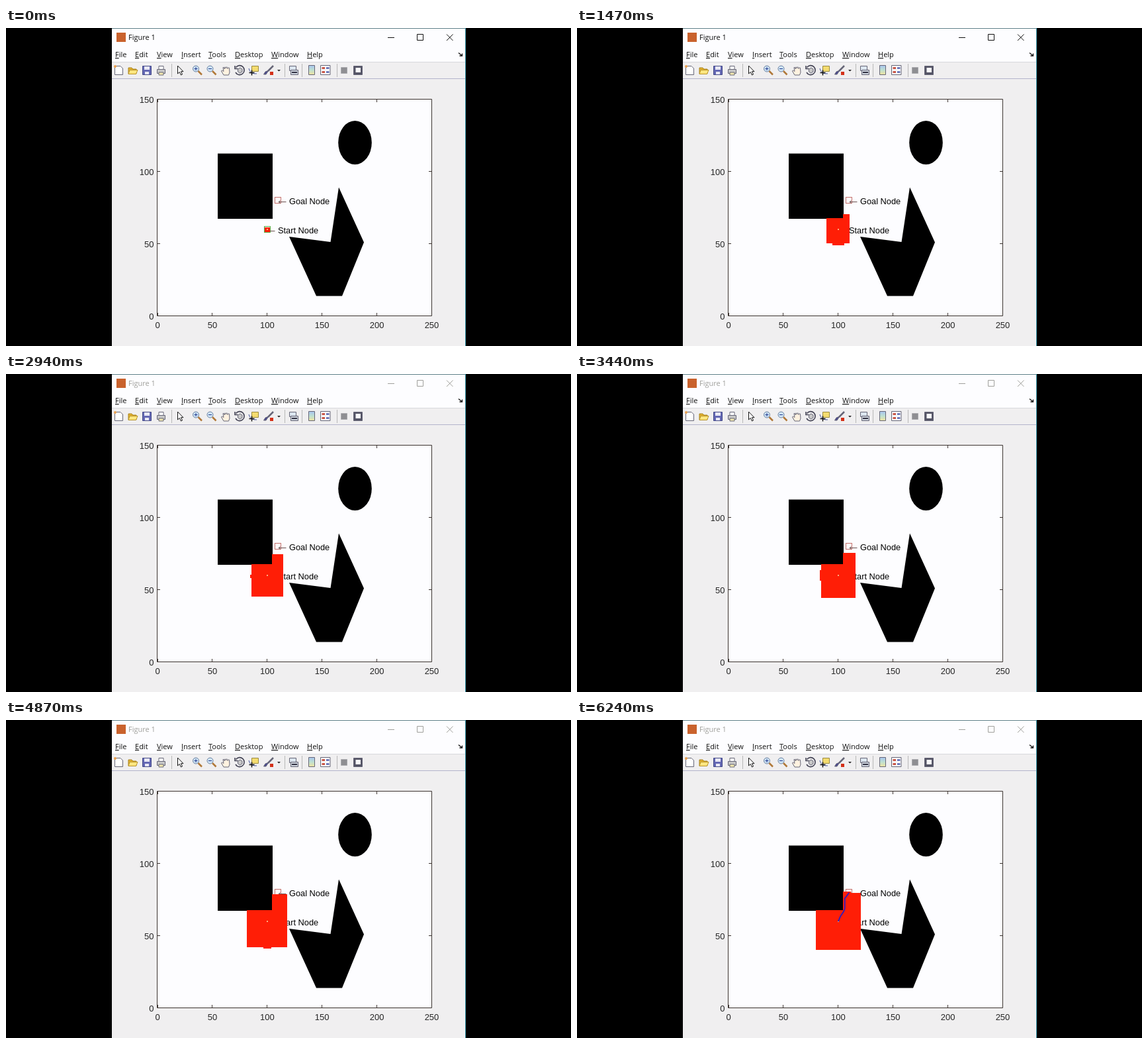
An HTML page with a canvas that plays this animation: 854 by 480 pixels, repeating every 6.27 s.

```html
<!DOCTYPE html>
<html lang="en">
<head>
<meta charset="utf-8">
<title>Grid search</title>
<style>
html, body { margin: 0; width: 100%; height: 100%; overflow: hidden; background: #000; }
svg, canvas { position: absolute; left: 0; top: 0; }
.ui { font: 11px "Open Sans", "Noto Sans", sans-serif; fill: #111; }
.plot { font: 13px "Liberation Sans", Arial, sans-serif; fill: #262626; }
.note { font: 12.8px "Liberation Sans", Arial, sans-serif; fill: #000; }
#caption { --ink: #111; }
#caption.idle { --ink: #a0a09c; }
#caption text { fill: var(--ink); }
#caption path { stroke: var(--ink); fill: none; }
</style>
</head>
<body>
<svg width="854" height="480" viewBox="0 0 854 480">
  <rect x="160" width="534" height="480" fill="#f0eff0"/>
  <rect x="160" y="1" width="534" height="50" fill="#fdfdff"/>
  <path d="M694.5 0V480" stroke="#3f9fb4"/>
  <path d="M160 .5H694" stroke="#5f8088"/>
  <path d="M160 51.5H694" stroke="#d8d8dc"/>
  <path d="M160 76.5H694" stroke="#b4b4cc"/>

  <g id="caption">
    <rect x="167" y="7" width="14" height="14" fill="#c9622d"/>
    <text class="ui" x="185" y="18">Figure 1</text>
    <path d="M577 14.5H587M621.5 9.5H630.5V18.5H621.5ZM666 9.5L675.5 19M675.5 9.5L666 19"/>
  </g>
  <g class="ui" id="menu"></g>
  <path d="M684 37.5L689 41.5M689.5 38.5V42H685.5" stroke="#111" fill="none" stroke-width="1.3"/>

  <g id="tools" stroke="#667" fill="none">
    <path d="M250.5 54V74M421.5 54V74M447.5 54V74M500.5 54V74" stroke="#b8b8b8"/>
    <path d="M164.5 57.5H173L176.5 61V70.5H164.5Z" fill="#fff"/>
    <circle cx="165" cy="58" r="2" fill="#e8a050" stroke="none"/>
    <path d="M185 60H190L192 62H197V69H185Z" fill="#e0b030" stroke="#a88420"/>
    <path d="M187 63.5H199L196.5 69.5H185Z" fill="#ffe680" stroke="#b8942a"/>
    <path d="M206.5 57.5H219.5V70.5H206.5Z" fill="#6468b4" stroke="#444a88"/>
    <path d="M209 58H217V63H209ZM210 66H216V70H210Z" fill="#e8e8f4" stroke="none"/>
    <path d="M231 62V57.5H238V62" fill="#fff"/>
    <path d="M228.5 62.5H240.5V68.5H228.5Z" fill="#c8c8c8"/>
    <path d="M231 67H238V71H231Z" fill="#f4eab0"/>
    <path d="M259.5 57V69L262.3 66.4L264.5 71L266.500 70L264.4 65.7H268Z" fill="#fff" stroke="#111"/>
    <g id="lens">
      <circle cx="287" cy="61.5" r="4.5" fill="#cfe4f4" stroke="#6a80a0"/>
      <path d="M290.5 65L296 70.5" stroke="#b07838" stroke-width="2.5"/>
      <path d="M284.5 61.5H289.5" stroke="#223a90"/>
    </g>
    <use href="#lens" x="21.5"/>
    <path d="M287 59V64" stroke="#223a90"/>
    <path d="M329 71L325.5 65Q326 63 329 65.5L328 59.5Q329 58 330.5 62Q330.5 56 332.5 61Q334 56 335 61.5Q337 58 337.5 61L338 67L336.5 71Z" fill="#fff2e0"/>
    <path d="M347.5 59.5A7 7 0 1 1 347 67M346 57V61.5H350.5" stroke="#445" stroke-width="1.6"/>
    <path d="M350.5 62L354 60L357 62V66L353.5 68L350.5 66Z" fill="#c8c8c8"/>
    <path d="M371.5 57.5H381.5V65.5H371.5Z" fill="#f4dc70" stroke="#9a8a40"/>
    <path d="M367 61Q369 70 379 69" stroke="#4455a0"/>
    <path d="M371.5 63.5V71.5M367.5 67.5H375.5" stroke="#111" stroke-width="1.5"/>
    <path d="M404 57L396 65" stroke="#667" stroke-width="2.5"/>
    <path d="M397 64L393 70H389.5L392 66Z" fill="#4a4a90"/>
    <rect x="399" y="66" width="5" height="5" fill="#d33018" stroke="none"/>
    <path d="M410 63H415L412.5 65.5Z" fill="#222" stroke="none"/>
    <path d="M428.5 57.5H438.5V64.5H428.5Z" fill="#dce6f0"/>
    <path d="M430.5 63.5H441.5V70.5H430.5Z" fill="#ccd2dc"/>
    <path d="M432 67H440" stroke="#334" stroke-width="2"/>
    <path d="M457.5 56.5H466.5V70.5H457.5Z" fill="url(#bar)"/>
    <path d="M475.5 56.5H490V70.5H475.5Z" fill="#f8f8fa"/>
    <path d="M477.5 59H482V62H477.5ZM477.5 65H482V68H477.5Z" fill="#c85848" stroke="none"/>
    <path d="M484 60.5H488.5M484 66.5H488.5" stroke="#3848a0" stroke-width="2"/>
    <path d="M506.5 59.5H515.5V68.5H506.5Z" fill="#8e8e92" stroke="#aaaaae"/>
    <path d="M525.5 57.5H538.5V70.5H525.5Z" fill="#556"/>
    <path d="M528.5 60H536V67H528.5Z" fill="#f8f8fa" stroke="none"/>
  </g>
  <linearGradient id="bar" x2="0" y2="1">
    <stop stop-color="#a8c4f0"/><stop offset=".5" stop-color="#bfe0d0"/><stop offset="1" stop-color="#f0e4a0"/>
  </linearGradient>

  <rect x="229" y="108" width="414" height="327" fill="#fdfdff"/>
  <rect x="320" y="189.5" width="83" height="98.500"/>
  <ellipse cx="527.5" cy="173" rx="25.3" ry="33"/>
  <path d="M428 315L490.5 323L503 240.5L541 323.500L508 404.5H469Z"/>
  <g class="plot" id="axes">
    <path id="frame" fill="none" stroke="#3c3430"/>
  </g>
  <rect x="406.5" y="255.5" width="9" height="9" fill="none" stroke="#c4706c"/>
  <rect x="390.5" y="299.5" width="9" height="9" fill="none" stroke="#58b048"/>
  <path d="M412 262.5H423.5M414.5 260.5L412 262.5L414.5 264.5M395.5 306.5H406.5" fill="none" stroke="#6a5050"/>
  <g class="note">
    <text x="428" y="266">Goal Node</text>
    <text x="411" y="309.5">Start Node</text>
  </g>
</svg>
<canvas id="search" width="854" height="480"></canvas>

<script>
const LOOP = 6270, PATH_AT = 6200, IDLE_AT = 1950;
const START = { u: 100, v: 60 };
const px = u => 229 + u * 1.658;
const py = v => 435 - v * 2.18;
const crisp = n => Math.floor(n) + 0.5;

function addText(parent, x, y, text, anchor = "start") {
  const el = document.createElementNS("http://www.w3.org/2000/svg", "text");
  el.setAttribute("x", x);
  el.setAttribute("y", y);
  el.setAttribute("text-anchor", anchor);
  el.textContent = text;
  parent.append(el);
  return el;
}

const menu = document.getElementById("menu");
const items = { File: 165, Edit: 195, View: 228, Insert: 265, Tools: 306, Desktop: 346, Window: 401, Help: 455 };
for (const [name, x] of Object.entries(items)) {
  const el = addText(menu, x, 44, "");
  el.innerHTML = `<tspan text-decoration="underline">${name[0]}</tspan>${name.slice(1)}`;
}

const axes = document.getElementById("axes");
let frame = "M228.5 107.5H643.5V434.5H228.5Z";
for (let u = 0; u <= 250; u += 50) {
  const x = crisp(px(u));
  addText(axes, px(u), 453, u, "middle");
  frame += `M${x} 434v-4M${x} 108v4`;
}
for (let v = 0; v <= 150; v += 50) {
  const y = crisp(py(v) - 0.5);
  addText(axes, 223.5, py(v) + 5, v, "end");
  frame += `M229 ${y}h4M643 ${y}h-4`;
}
document.getElementById("frame").setAttribute("d", frame);

// Visit order: rings around the start, each side from its middle outwards.
const cells = [];
function visit(du, dv) {
  const u = START.u + du, v = START.v + dv;
  if (u <= 105 && v >= 68) return;
  cells.push([u, v]);
}
function side(reach, put) {
  put(0);
  for (let d = 1; d <= reach; d++) { put(-d); put(d); }
}
visit(0, 0);
for (let r = 1; r <= 19; r++) {
  side(r - 1, d => visit(d, r));
  side(r - 1, d => visit(d, -r));
  side(r, d => visit(-r, d));
  side(r, d => visit(r, d));
}
for (let du = 6; du <= 10; du++) visit(du, 20);

// [time, visited cells]: the search slows as the plot fills.
const pace = [[0, 9], [730, 172], [1470, 344], [2440, 557], [3440, 746], [4870, 1012], [6180, 1226]];
function visited(t) {
  for (let i = 1; i < pace.length; i++) {
    const [t0, n0] = pace[i - 1], [t1, n1] = pace[i];
    if (t <= t1) return Math.round(n0 + (n1 - n0) * (t - t0) / (t1 - t0));
  }
  return cells.length;
}

const ctx = document.getElementById("search").getContext("2d");
const caption = document.getElementById("caption");
const route = [[100, 60], [102, 63.5], [105, 67], [106, 69], [106, 76], [110, 80]];

function draw(t) {
  ctx.clearRect(0, 0, 854, 480);
  ctx.fillStyle = "#ff1e06";
  const count = visited(t);
  for (let i = 0; i < count; i++) {
    const [u, v] = cells[i];
    ctx.fillRect(Math.round(px(u) - 2.5), Math.round(py(v) - 1.5), 5, 3);
  }
  ctx.fillStyle = "#ffb080";
  ctx.fillRect(394, 303, 2, 2);
  if (t >= PATH_AT) {
    ctx.beginPath();
    for (const [u, v] of route) ctx.lineTo(px(u), py(v));
    ctx.strokeStyle = "#3a1cb4";
    ctx.lineWidth = 2;
    ctx.stroke();
  }
  caption.classList.toggle("idle", t >= IDLE_AT);
}

const began = performance.now();
function tick() {
  draw((performance.now() - began) % LOOP);
  requestAnimationFrame(tick);
}
tick();
</script>
</body>
</html>
```
